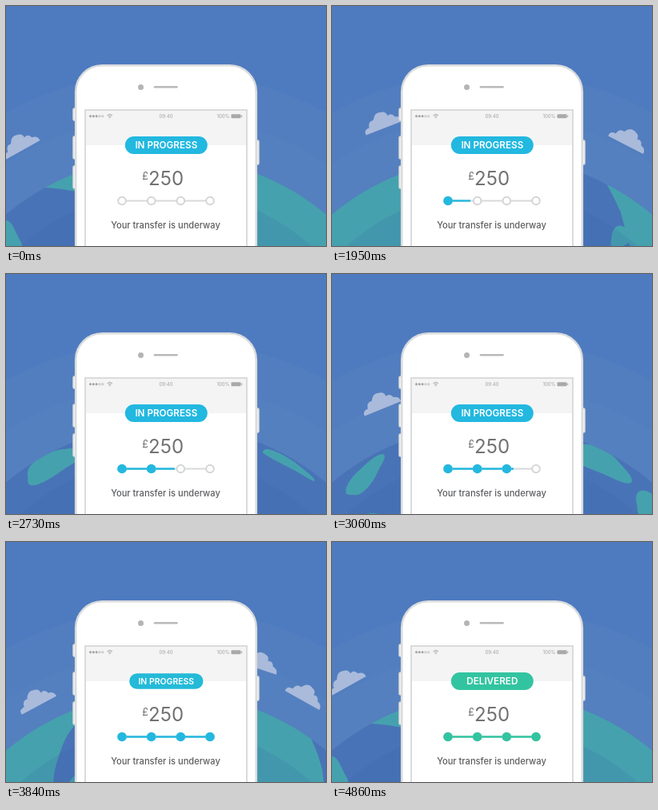
Animation of 400x300 px, one loop 7.08 s. Source, as an HTML page:

```html
<!DOCTYPE html>
<html lang="en">
<head>
<meta charset="utf-8">
<title>Transfer status</title>
<style>
html, body { margin: 0; width: 100%; height: 100%; overflow: hidden; background: #4e7bbf; }
svg { display: block; width: 400px; height: 300px; }
text { font-family: Inter, "Open Sans", sans-serif; }
.small { font-size: 6px; fill: #a2a2a2; }
.pill { font-weight: 600; font-size: 11.7px; fill: #fff; text-anchor: middle; }
</style>
</head>
<body>
<svg viewBox="0 0 400 300">
  <defs><clipPath id="disc"><circle cx="200" cy="500" r="312"/></clipPath></defs>
  <rect width="400" height="300" fill="#4e7bbf"/>
  <circle cx="200" cy="500" r="418" fill="#527ebf"/>
  <circle cx="200" cy="500" r="363" fill="#5580bf"/>
  <circle cx="200" cy="500" r="312" fill="#4973b7"/>
  <g clip-path="url(#disc)"><g id="lands"></g></g>
  <circle cx="200" cy="500" r="270" fill="#2c5c9e" opacity=".14"/>
  <g id="clouds" fill="#a9badb"></g>

  <g fill="#f4f4f4" stroke="#d9dadc" stroke-width="1.5">
    <rect x="84" y="128" width="6" height="15" rx="1.5"/>
    <rect x="84" y="163" width="6" height="28" rx="1.5"/>
    <rect x="84" y="200" width="6" height="28" rx="1.5"/>
    <rect x="310" y="168" width="6" height="30" rx="1.5"/>
  </g>
  <rect x="87.2" y="74.2" width="225.6" height="300" rx="33" fill="#fff" stroke="#dadbdd" stroke-width="2.6"/>
  <circle cx="168.5" cy="101.5" r="3.5" fill="#b5b5b7"/>
  <path d="M186 101.2H213.5" stroke="#b9b9bb" stroke-width="2.6" stroke-linecap="round"/>
  <rect x="99" y="130" width="202" height="200" fill="#fff" stroke="#dadbdd" stroke-width="2"/>
  <rect x="100" y="131" width="200" height="43" fill="#f4f4f5"/>

  <g id="signal" fill="#a2a2a2" stroke="#a2a2a2" stroke-width=".6"></g>
  <g fill="none" stroke="#a2a2a2">
    <path d="M126.5 136.6q3.2-2.6 6.4 0M127.8 138.2q1.9-1.6 3.8 0"/>
    <circle cx="129.7" cy="139.6" r=".4"/>
  </g>
  <text class="small" x="200" y="140" text-anchor="middle">09:40</text>
  <text class="small" x="279.5" y="140" text-anchor="end">100%</text>
  <rect x="281.5" y="135.3" width="12" height="5" rx="1" fill="#a9a9a9"/>
  <rect x="294" y="136.7" width="1.2" height="2.2" fill="#a9a9a9"/>

  <g id="pill">
    <rect id="pillBox" x="-51.5" y="-11" width="103" height="22" rx="11"/>
    <text id="busy" class="pill" y="4.3">IN PROGRESS</text>
    <text id="done" class="pill" y="4.3">DELIVERED</text>
  </g>

  <g fill="#707173">
    <text x="170.3" y="216.5" font-size="12.5">£</text>
    <text x="178" y="224" font-size="24">250</text>
  </g>
  <path d="M145 243.5H255" stroke="#d8d9db" stroke-width="2"/>
  <path id="bar" stroke-width="2.4"/>
  <g id="stops"></g>
  <text x="199.5" y="278" text-anchor="middle" font-size="11.1" font-weight="500" fill="#5c5d60">Your transfer is underway</text>
</svg>
<script>
const NS = "http://www.w3.org/2000/svg";
const $ = id => document.getElementById(id);
const LOOP = 7080, STEP = 30;
const BLUE = [34, 184, 224], GREEN = [50, 196, 160];
const LAND = "#46a1ae", SEA = "#4973b7";

function add(parent, tag, attrs) {
  const el = document.createElementNS(NS, tag);
  for (const k in attrs) el.setAttribute(k, attrs[k]);
  return parent.appendChild(el);
}

// Wavy rounded patch on the globe: centre angle and radius, half width in
// degrees, half height in px; skew leans it, a low power squares it off
function patch(a, r, w, h, { skew = 0, power = 1, wave = .12, fill = LAND } = {}) {
  const bend = v => Math.sign(v) * Math.abs(v) ** power;
  const pts = [];
  for (let i = 0; i < 120; i++) {
    const q = i * Math.PI / 60;
    const k = 1 + wave * Math.sin(3 * q + a);
    const dy = h * k * bend(Math.sin(q));
    const ang = (a + w * k * bend(Math.cos(q)) + skew * dy) * Math.PI / 180;
    pts.push([200 + (r + dy) * Math.sin(ang), 500 - (r + dy) * Math.cos(ang)].map(v => v.toFixed(1)));
  }
  add($("lands"), "path", { d: "M" + pts.join("L") + "Z", fill });
}

patch(39, 250, 50, 100, { skew: -.3, power: .3, wave: .01 });
patch(-93, 250, 29, 100, { power: .3, wave: .01 });
patch(8.5, 262, 5.5, 32, { skew: .2, fill: SEA });
patch(-46.3, 278, 5.5, 29, { skew: .1 });
patch(93, 294, 5, 14, { skew: .25 });
patch(153, 298, 8, 14);
patch(169, 288, 4, 16);
patch(-149, 305, 7, 5);
patch(-19, 265, 2.6, 15);

const puff = "M-21 8q-1-6 6-6q1-7 7-6q4-8 11-5q5 1 5 6q5-2 7 4q6 1 6 7Z";
[[-29.2, 376], [6.8, 345], [-77.5, 382], [-130.5, 373], [103.5, 368], [64.4, 356], [53.5, 370]].forEach(([a, r]) =>
  add($("clouds"), "path", { d: puff, transform: `rotate(${a} 200 500) translate(200 ${500 - r}) scale(1.17)` }));

for (let i = 0; i < 5; i++)
  add($("signal"), "circle", { cx: 105.5 + i * 3.8, cy: 137.8, r: 1.2, "fill-opacity": i < 3 ? 1 : 0 });

const stops = [0, 1, 2, 3].map(i => {
  const x = 145 + i * 110 / 3;
  add($("stops"), "circle", { cx: x, cy: 243.5, r: 4.8, fill: "#fff", stroke: "#d4d5d7", "stroke-width": 2 });
  return { x, dot: add($("stops"), "circle", { cx: x, cy: 243.5, r: 0 }) };
});

const part = (t, a, b) => Math.min(1, Math.max(0, (t - a) / (b - a)));
const smooth = p => p * p * (3 - 2 * p);
const mix = p => `rgb(${BLUE.map((c, i) => Math.round(c + (GREEN[i] - c) * p))})`;

// Cubic easing (x1, 0, x2, 1)
function ease(p, x1 = .43, x2 = .47) {
  let lo = 0, hi = 1;
  for (let i = 0; i < 24; i++) {
    const s = (lo + hi) / 2, u = 1 - s;
    if (3 * x1 * s * u * u + 3 * x2 * s * s * u + s * s * s < p) lo = s; else hi = s;
  }
  return smooth(lo);
}

function draw(t) {
  const turn = 360 * ease(part(t, 910, 4860));
  for (const id of ["lands", "clouds"])
    $(id).setAttribute("transform", `rotate(${turn.toFixed(3)} 200 500)`);

  const run = part(t, 1370, 3640);
  const tint = mix(part(t, 3900, 4170));
  $("bar").setAttribute("d", `M145 243.5h${(110 * run).toFixed(2)}`);
  $("bar").setAttribute("stroke", run ? tint : "none");
  stops.forEach(({ x, dot }, i) => {
    const start = i ? 1370 + (x - 149) / 110 * 2270 : 1200;
    const grow = smooth(part(t, start, start + 150));
    // the grey ring stays until the fill has covered it
    dot.setAttribute("r", (5.8 * grow).toFixed(2));
    dot.setAttribute("fill", tint);
  });

  const dip = smooth(part(t, 3780, 3870)) - smooth(part(t, 3870, 4080));
  $("pill").setAttribute("transform", `translate(200.3 174) scale(${(1 - .14 * dip).toFixed(3)})`);
  $("pillBox").setAttribute("fill", mix(part(t, 3810, 4050)));
  $("busy").setAttribute("opacity", 1 - part(t, 3840, 3930));
  $("done").setAttribute("opacity", part(t, 3930, 4050));
}

const t0 = performance.now();
function tick() {
  const t = (performance.now() - t0) % LOOP;
  draw(Math.floor(t / STEP) * STEP);
  requestAnimationFrame(tick);
}
tick();
</script>
</body>
</html>
```
